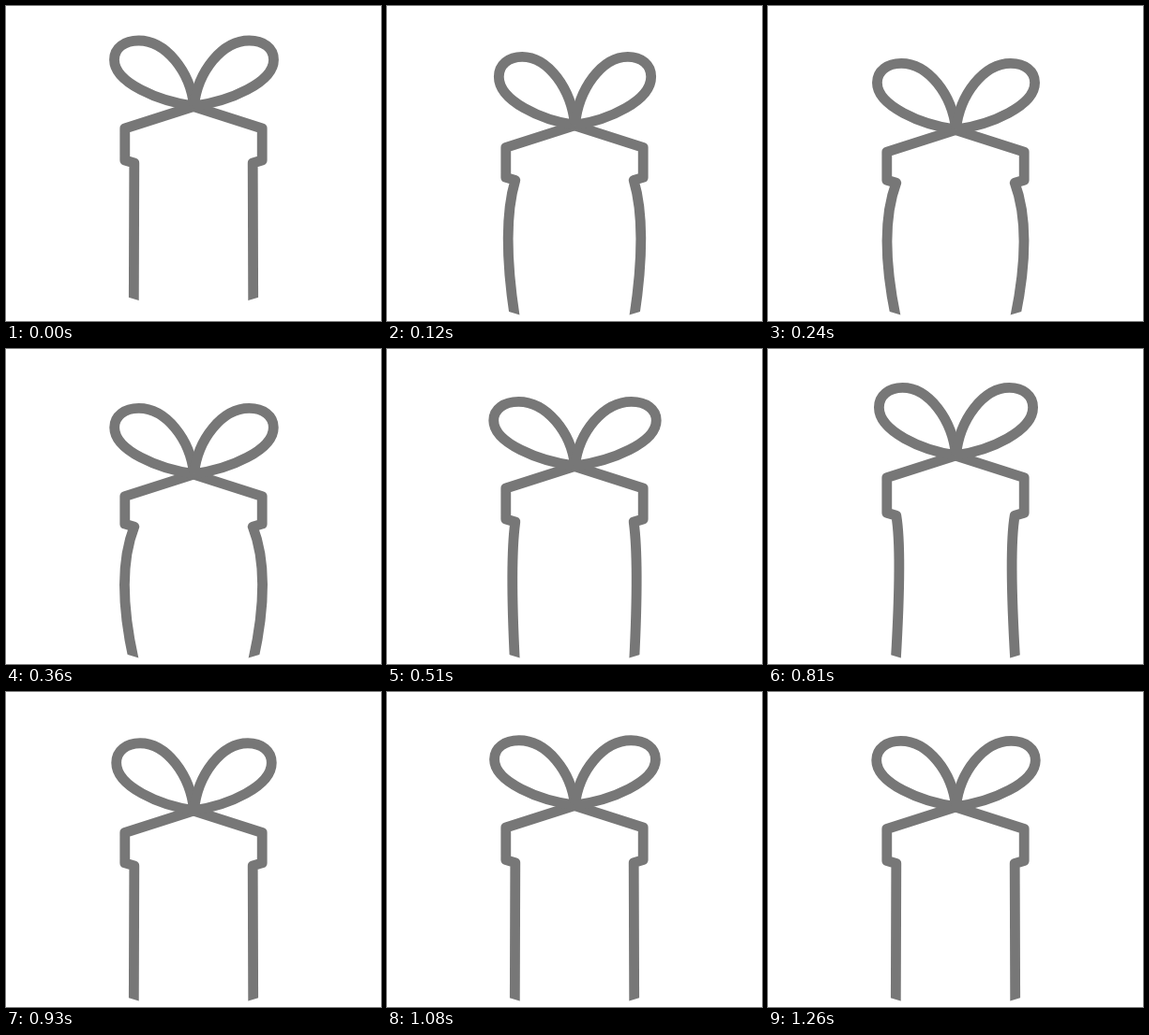
Write an HTML page that moves like this. It is 400 by 337 pixels and loops after 3320 ms.

```html
<!DOCTYPE html>
<html lang="en">
<head>
<meta charset="utf-8">
<title>Bouncing gift box</title>
<style>
  html, body { margin: 0; width: 100%; height: 100%; overflow: hidden; background: #fff; }
  svg { display: block; width: 100%; height: 100%; }
</style>
</head>
<body>
<svg viewBox="0 0 400 337" fill="none" stroke="#777" stroke-width="10.8" stroke-linejoin="round">
  <clipPath id="floor"><path d="M0 0H400V288L200 348L0 288Z"/></clipPath>
  <g id="gift" clip-path="url(#floor)">
    <path id="side"/>
    <use href="#side" transform="translate(400) scale(-1 1)"/>
    <path id="loop"/>
    <use href="#loop" transform="translate(401) scale(-1 1)"/>
  </g>
</svg>
<script>
const LOOP = 3320, STEP = 30, LAG = 90;
const $ = id => document.getElementById(id);

// [time, offset from rest] of the squash, leap and settle
const lift = [[0, 0], [340, 11.2], [630, -9], [700, -20], [930, 4], [1080, -1.5], [1260, 0]];
const bend = [[0, 0], [120, -7.5], [340, -10.4], [700, 6], [930, 0]];

// Monotone cubic interpolation: flat at extremes, smooth in between
function sample(keys, t) {
  const last = keys.length - 1;
  if (t >= keys[last][0]) return keys[last][1];
  const slope = i => (keys[i + 1][1] - keys[i][1]) / (keys[i + 1][0] - keys[i][0]);
  const tangent = i => {
    if (i === 0) return slope(0);
    if (i === last) return 0;
    const a = slope(i - 1), b = slope(i);
    return a * b > 0 ? 2 * a * b / (a + b) : 0;
  };
  const i = keys.findIndex(k => k[0] > t) - 1;
  const [t0, v0] = keys[i], [t1, v1] = keys[i + 1];
  const d = t1 - t0, u = (t - t0) / d, w = 1 - u;
  return v0 * w * w * (1 + 2 * u) + v1 * u * u * (3 - 2 * u)
    + d * u * w * (tangent(i) * w - tangent(i + 1) * u);
}

const drop = t => Math.min(0, t / 90 - 1) * 15.5;
const height = t => drop(t) + sample(lift, t);

function draw(t) {
  const rise = sample(lift, t), bulge = sample(bend, t);
  const knot = 122.5 + rise, rim = 183.5 + 0.6 * rise;

  $("gift").setAttribute("transform", `translate(0 ${drop(t)})`);
  $("side").setAttribute("d",
    `M200 ${knot + 0.5}L126.8 ${knot + 24}V${rim - 3}L136.8 ${rim}` +
    `Q${136.8 + 2 * bulge} ${222 - 2 * bulge} 136.3 333`);

  // The bow trails the knot: wide on the way up, tall on the way down
  const drag = 0.27 * (height(t) - height(Math.max(0, t - LAG)));
  const sx = 1 - drag / 85, sy = 1 + 0.8 * drag / 70;
  const at = (x, y) => `${200.5 + x * sx} ${knot + y * sy} `;
  $("loop").setAttribute("d",
    "M" + at(0, 0) +
    "C" + at(-38, -5) + at(-85, -25) + at(-85, -49.5) +
    "C" + at(-85, -62) + at(-74, -70) + at(-59, -70) +
    "C" + at(-30, -70) + at(-4, -37) + at(0, 0));
}

const start = performance.now();
function tick() {
  const t = (performance.now() - start) % LOOP;
  draw(Math.floor(t / STEP) * STEP);
  requestAnimationFrame(tick);
}
tick();
</script>
</body>
</html>
```
